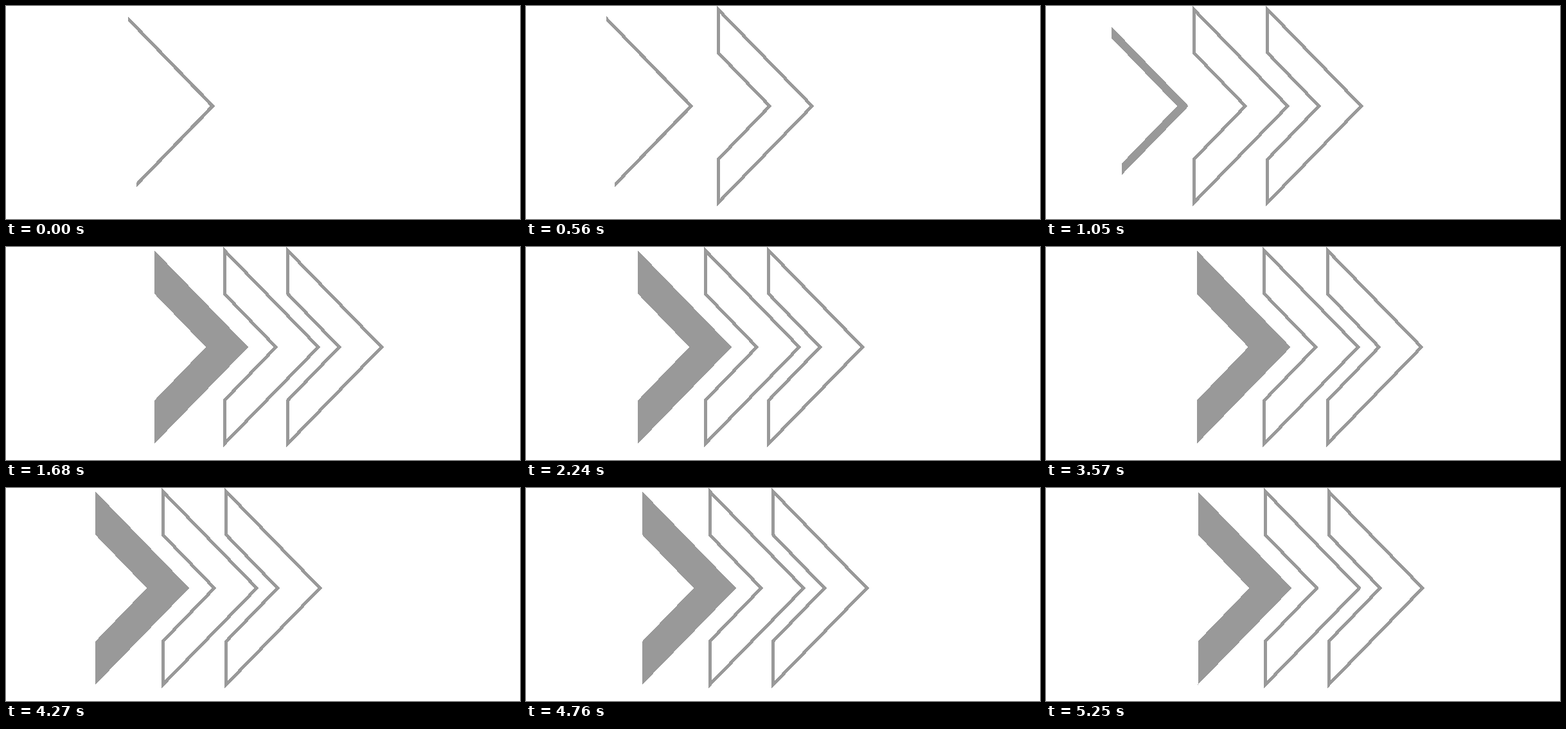
An HTML page for the animation above (5320 ms loop, 800 px wide and 332 px high).

```html
<!DOCTYPE html>
<html lang="en">
<head>
<meta charset="utf-8">
<title>Chevrons</title>
<style>
  html, body { margin: 0; width: 100%; height: 100%; overflow: hidden; background: #fff; }
  svg { display: block; }
  polygon { fill: none; stroke: #999; stroke-width: 5; stroke-miterlimit: 4; }
  .solid { fill: #999; stroke: none; }
</style>
</head>
<body>
<svg width="800" height="332" viewBox="0 0 800 332" shape-rendering="crispEdges">
  <polygon class="solid"/><polygon/><polygon/>
</svg>
<script>
const LOOP = 5320, STEP = 70, GROW = 280;
const WIDTH = 146, HALF = 150.5, BAND = 66, SLOPE = 83 / 80, MID = 156;

// offset in the row, entry time, initial lag and its duration,
// then the starting share of the upper arm, lower arm and band
const parts = [
  { offset: 0, born: 1050, lag: 74, settle: 1050, top: .82, bottom: .71, band: .27 },
  { offset: 105, born: 560, lag: 156, settle: 1120, top: .89, bottom: .8, band: .01 },
  { offset: 203.5, born: 0, lag: 264, settle: 1600, top: .89, bottom: .8, band: .01 }
];
const shapes = document.querySelectorAll("polygon");

// The row swings left in 840 ms and back right in 910 ms.
function sway(t) {
  const p = t % 1750;
  const angle = p < 840 ? p / 840 : 1 + (p - 840) / 910;
  return 187 + 49.5 * Math.cos(Math.PI * angle);
}

function chevron(part, t) {
  const age = t - part.born;
  if (age < 0) return "";
  const rest = Math.max(0, 1 - age / part.settle) ** 3.2;
  const growth = 1 - Math.max(0, 1 - age / GROW) ** 3;
  const grow = from => from + (1 - from) * growth;
  const tip = sway(t) + part.offset - part.lag * rest + WIDTH;
  const top = grow(part.top), bottom = grow(part.bottom);
  const band = BAND * grow(part.band);
  const inner = arm => (arm * WIDTH - band) * SLOPE;
  return [
    [tip - top * WIDTH, MID - top * HALF],
    [tip, MID],
    [tip - bottom * WIDTH, MID + bottom * HALF],
    [tip - bottom * WIDTH, MID + inner(bottom)],
    [tip - band, MID],
    [tip - top * WIDTH, MID - inner(top)]
  ].join(" ");
}

function draw() {
  const t = Math.floor(performance.now() % LOOP / STEP) * STEP;
  parts.forEach((part, i) => shapes[i].setAttribute("points", chevron(part, t)));
  requestAnimationFrame(draw);
}
draw();
</script>
</body>
</html>
```
